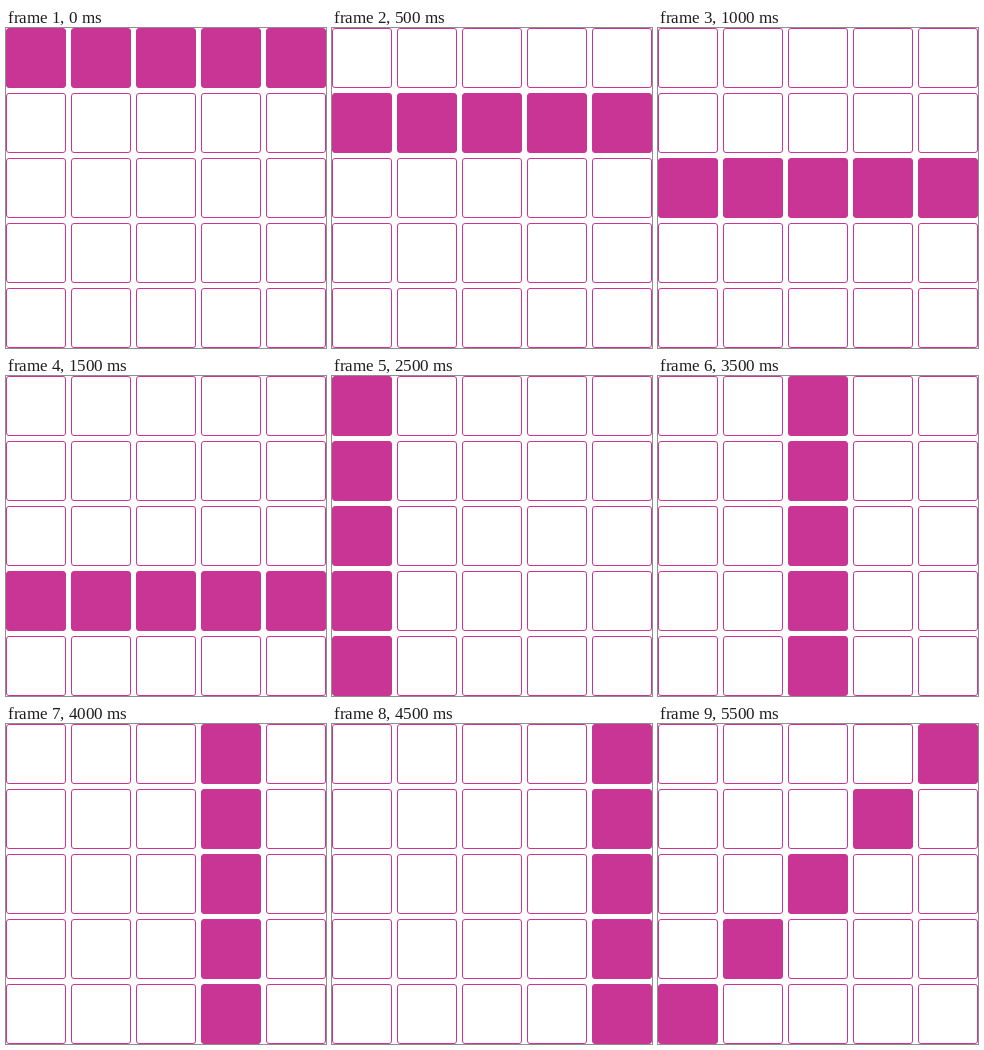
Animation, 320 px wide and 320 px high, one loop 6000 ms. Source, as an HTML page:

```html
<!DOCTYPE html>
<html lang="en">
<head>
<meta charset="utf-8">
<title>Grid lines</title>
<style>
  html, body { margin: 0; width: 100%; height: 100%; overflow: hidden; background: #fff; }
  #grid {
    display: grid;
    grid-template: repeat(5, 60px) / repeat(5, 60px);
    gap: 5px;
    width: 320px;
    height: 320px;
  }
  #grid div { box-sizing: border-box; border: 1px solid #c83594; border-radius: 3px; }
  #grid .on { background: #c83594; }
</style>
</head>
<body>
<div id="grid"></div>
<script>
const SIZE = 5, STEP = 500, STEPS = 12;
const grid = document.getElementById('grid');
const cells = Array.from({ length: SIZE * SIZE }, () =>
  grid.appendChild(document.createElement('div')));

// Five rows, five columns, then the two diagonals.
function isOn(row, col, step) {
  if (step < 5) return row === step;
  if (step < 10) return col === step - 5;
  return step === 10 ? row === col : row + col === SIZE - 1;
}

let shown = -1;
function draw(time) {
  const step = Math.floor(time / STEP) % STEPS;
  if (step === shown) return;
  shown = step;
  cells.forEach((cell, i) =>
    cell.classList.toggle('on', isOn(Math.floor(i / SIZE), i % SIZE, step)));
}

const start = performance.now();
function tick() {
  draw(performance.now() - start);
  requestAnimationFrame(tick);
}
tick();
</script>
</body>
</html>
```
